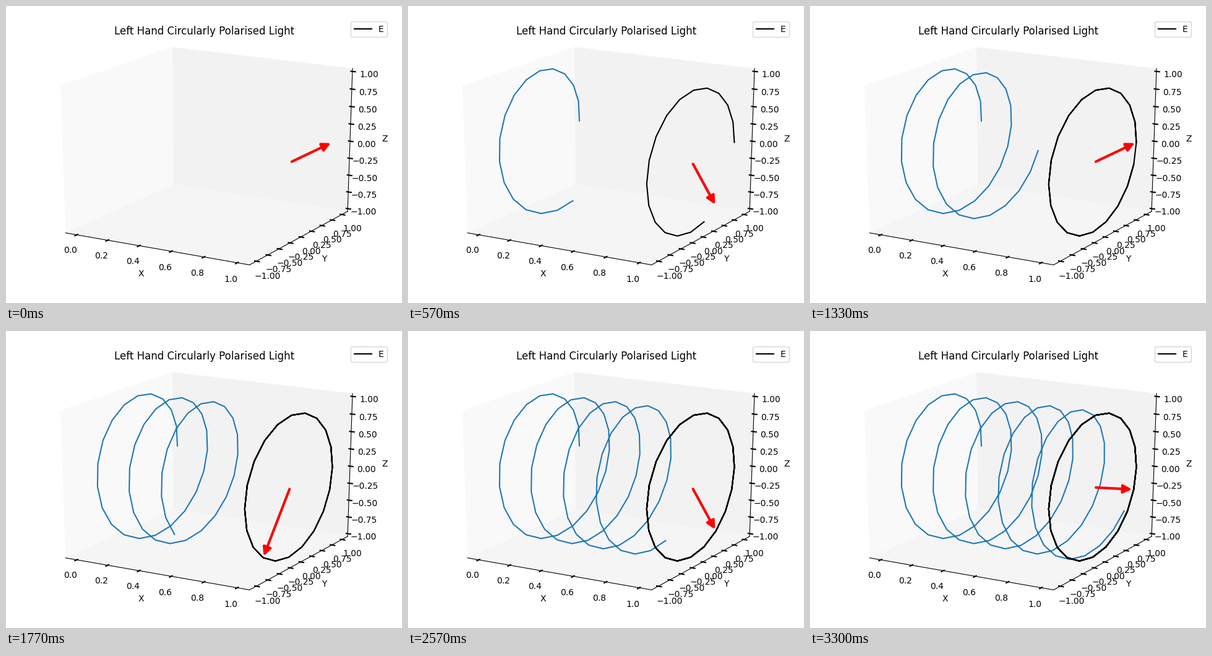
Animation of 640 by 480 pixels, one loop 3.33 s. Source, as a matplotlib script:

```python
import numpy as np
import matplotlib.pyplot as plt
from matplotlib.animation import FuncAnimation
from matplotlib.patches import FancyArrowPatch, Polygon

W, H = 640, 480
LOOP_MS, TICK_MS = 3330, 10
STEPS = 100
STEPS_PER_TURN = 20

PAPER = "white"
WALL_X, WALL_Y, FLOOR = "#f9f9f9", "#f2f2f2", "#f5f5f5"

plt.rcParams["font.family"] = "DejaVu Sans"
plt.rcParams["font.size"] = 10

# Camera: the data box is a unit cube centred on the origin
ELEV, AZIM, DIST = np.radians(20), np.radians(-60), 10
CENTRE = np.array([328.2, 233.8])
SCALE = np.array([325.9, -239.6])
EDGE = 0.5 + 1 / 48  # panes reach slightly past the limits
TICK_OUT, TICK_IN = 1 / 60, 1 / 120
TICK_LABEL_GAP, AXIS_LABEL_GAP = 0.061, 0.132


def project(x, y, z):
    """Cube coordinates to stage pixels."""
    ce, se, ca, sa = np.cos(ELEV), np.sin(ELEV), np.cos(AZIM), np.sin(AZIM)
    near = ce * (ca * x + sa * y) + se * z
    right = -sa * x + ca * y
    up = -se * (ca * x + sa * y) + ce * z
    f = 1 / (1 - near / DIST)
    return CENTRE[0] + SCALE[0] * right * f, CENTRE[1] + SCALE[1] * up * f


def to_cube(x, y, z):
    """Data limits: x -0.05..1.05, y -1.1..1.1, z -1..1."""
    return (x - 0.5) / 1.1, y / 2.2, z / 2


def field(x, phase):
    return project(*to_cube(x, np.cos(phase), np.sin(phase)))


fig = plt.figure(figsize=(W / 100, H / 100), dpi=100, facecolor=PAPER)
ax = fig.add_axes([0, 0, 1, 1])
ax.set_xlim(0, W)
ax.set_ylim(H, 0)
ax.axis("off")


def pane(corners, color):
    pts = [project(*(EDGE * s for s in c)) for c in corners]
    ax.add_patch(Polygon(pts, facecolor=color, edgecolor="none", zorder=0))


def segment(a, b, width):
    (x0, y0), (x1, y1) = project(*a), project(*b)
    ax.plot([x0, x1], [y0, y1], color="black", lw=width, zorder=1)


def draw_axis(name, dim, side, tick_dim, values, fmt):
    """Spine, ticks and labels on the box edge given by its outward signs."""
    side = np.array(side)

    def on_edge(pos, gap=0.0):
        p = side * (EDGE + gap)
        p[dim] = pos
        return p

    segment(on_edge(-EDGE), on_edge(EDGE), 0.8)
    outward = np.zeros(3)
    outward[tick_dim] = side[tick_dim]
    for v in values:
        pos = to_cube(v, v, v)[dim]
        p = on_edge(pos)
        segment(p + outward * TICK_OUT, p - outward * TICK_IN, 1.5)
        ax.text(*project(*on_edge(pos, TICK_LABEL_GAP)),
                fmt.format(v).replace("-", "\u2212"), ha="center", va="top")
    ax.text(*project(*on_edge(0, AXIS_LABEL_GAP)), name,
            ha="center", va="center")


pane([(-1, -1, -1), (-1, 1, -1), (-1, 1, 1), (-1, -1, 1)], WALL_X)
pane([(-1, 1, -1), (1, 1, -1), (1, 1, 1), (-1, 1, 1)], WALL_Y)
pane([(-1, -1, -1), (-1, 1, -1), (1, 1, -1), (1, -1, -1)], FLOOR)

quarters = np.linspace(-1, 1, 9)
draw_axis("X", 0, (0, -1, -1), 1, np.linspace(0, 1, 6), "{:.1f}")
draw_axis("Y", 1, (1, 0, -1), 0, quarters, "{:.2f}")
draw_axis("Z", 2, (1, 1, 0), 0, quarters, "{:.2f}")

ax.text(321, 46, "Left Hand Circularly Polarised Light",
        fontsize=12, ha="center", va="baseline")

wave, = ax.plot([], [], color="#1f77b4", lw=1.5, zorder=3)
ring, = ax.plot([], [], color="black", lw=1.5, zorder=4, label="E")
origin = project(*to_cube(1, 0, 0))
arrow = FancyArrowPatch(origin, field(1, 0), arrowstyle="-|>",
                        mutation_scale=20, lw=3, color="red", zorder=5)
ax.add_patch(arrow)

ax.legend(handles=[ring], loc="upper right",
          bbox_to_anchor=(623 / W, 1 - 18 / H))


def update(tick):
    step = (6 * tick + 3) // 20  # 30 steps per second on a 10 ms clock
    n = np.arange(step)
    phase = 2 * np.pi * n / STEPS_PER_TURN
    wave.set_data(*field(n / STEPS, phase))
    ring.set_data(*field(1, phase))
    arrow.set_positions(origin, field(1, 2 * np.pi * step / STEPS_PER_TURN))
    return wave, ring, arrow


anim = FuncAnimation(fig, update, frames=LOOP_MS // TICK_MS,
                     init_func=lambda: update(0), interval=TICK_MS,
                     repeat=True, repeat_delay=0, blit=True)
plt.show()
```
